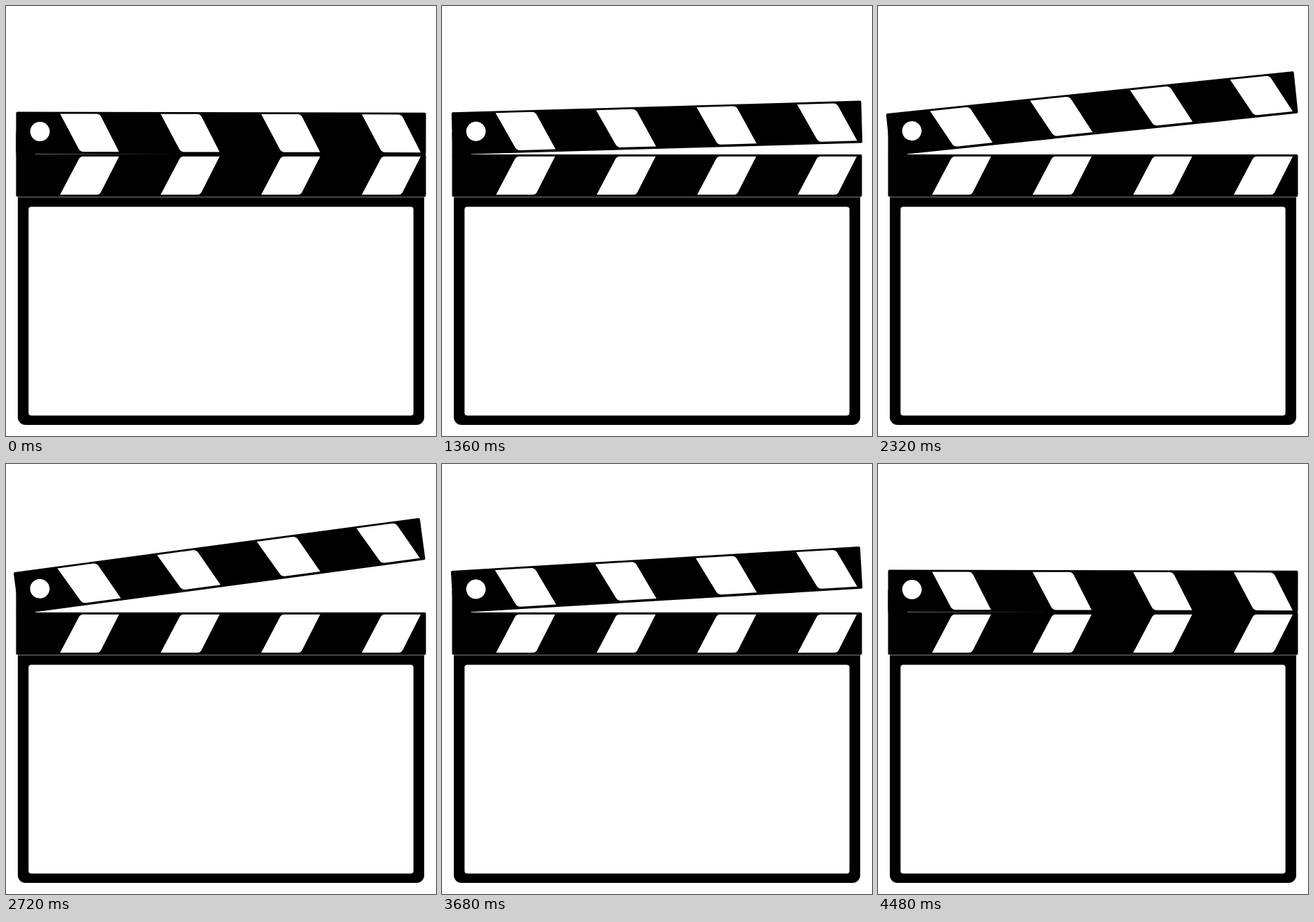
These frames come from a looping animation (620 by 620 pixels, 4.52 s). An HTML page:

```html
<!DOCTYPE html>
<html lang="en">
<head>
<meta charset="utf-8">
<title>Clapperboard</title>
<style>
html, body { margin: 0; width: 100%; height: 100%; overflow: hidden; background: #fff }
svg { display: block; width: 100vw; height: 100vh }
</style>
</head>
<body>
<svg viewBox="0 0 620 620">
  <rect x="17" y="260" width="586" height="344" rx="11"/>
  <rect x="32.5" y="289.5" width="555" height="301" rx="4" fill="#fff"/>
  <rect x="14.5" y="214" width="591" height="61" rx="2"/>
  <path d="M17 275.5H603" stroke="#fff" stroke-dasharray="1 1"/>
  <path d="M14.5 182H42V216H14.5Z"/>
  <path id="lower" fill="#fff"/>
  <g id="arm">
    <rect x="14.5" y="152.5" width="591" height="61" rx="2"/>
    <path id="upper" fill="#fff"/>
    <circle cx="49" cy="181" r="14" fill="#fff"/>
  </g>
</svg>
<script>
const LOOP = 4520, STEP = 40;
const NUDGED = 680, OPEN = 3400, SHUT = 4480; // ms
const REST = -.12, AJAR = .25, WIDE = 9;      // degrees
const el = id => document.getElementById(id);

// Four slanted stripes from y to y + h, with their blunt corners rounded by r.
function stripes(y, h, r) {
  const dx = r * .456, dy = r * .89 * Math.sign(h);
  let d = '';
  for (let x = 78; x < 600; x += 145) {
    d += `M${x} ${y}H${x + 57 - r}q${r} 0 ${r + dx} ${dy}L${x + 85} ${y + h}` +
      `H${x + 29 + r}q${-r} 0 ${-r - dx} ${-dy}Z`;
  }
  return d;
}
el('upper').setAttribute('d', stripes(155.3, 54.7, 5));
el('lower').setAttribute('d', stripes(272, -55, 4));

const mix = (a, b, u) => a + (b - a) * u;
const smooth = u => u * u * (3 - 2 * u);
const settle = u => 1 - (1 - u) ** 3.15;

// A slight lift, a slow swing open, then a snap that settles shut.
function angleAt(t) {
  if (t < NUDGED) return mix(REST, AJAR, t / NUDGED);
  if (t < OPEN) return mix(AJAR, WIDE, smooth((t - NUDGED) / (OPEN - NUDGED)));
  return mix(WIDE, REST, settle(Math.min(1, (t - OPEN) / (SHUT - OPEN))));
}

function draw(now) {
  const t = Math.floor(now % LOOP / STEP) * STEP;
  el('arm').setAttribute('transform', `rotate(${-angleAt(t)} 40 182)`);
  requestAnimationFrame(draw);
}
draw(performance.now());
</script>
</body>
</html>
```
